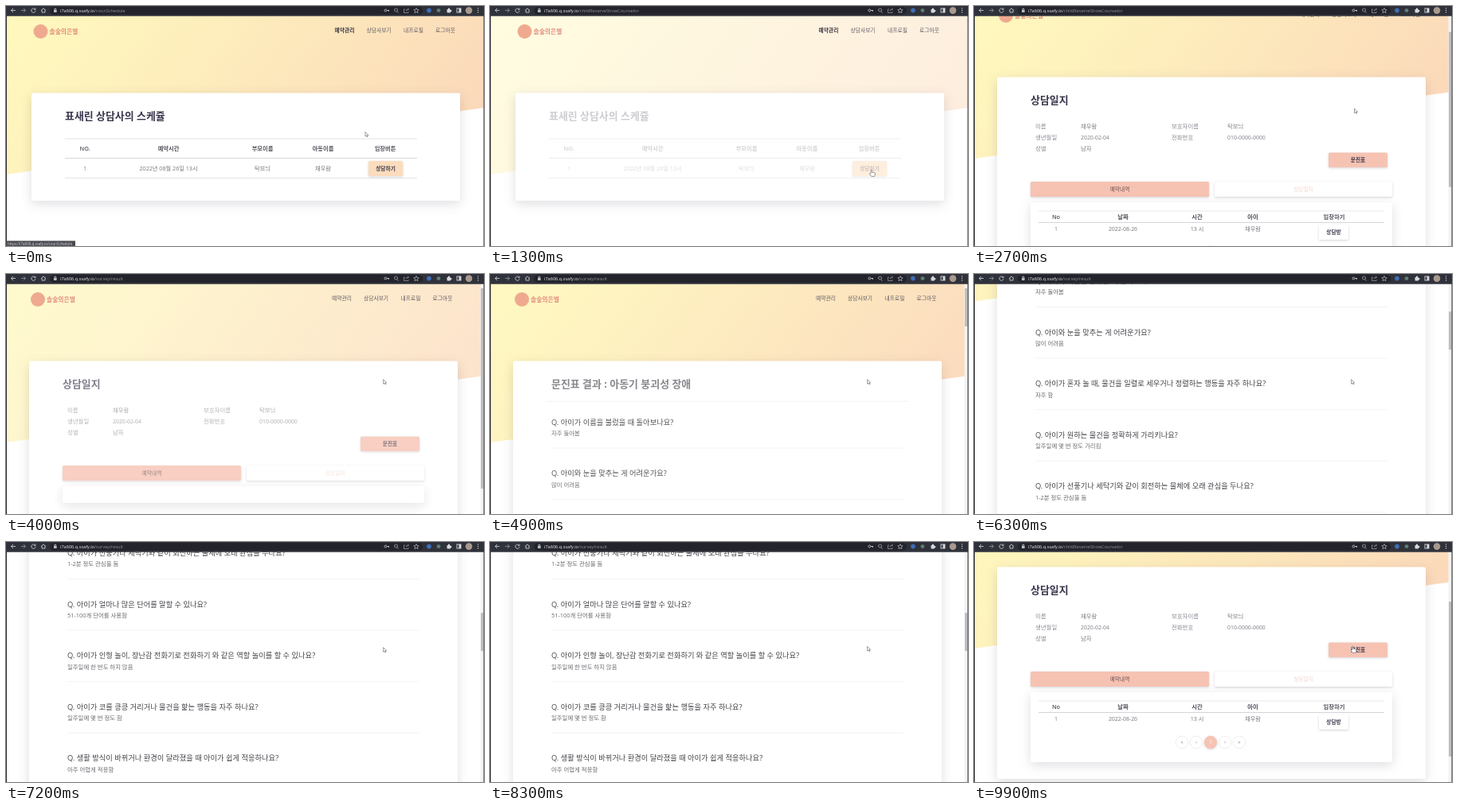
Write an HTML page that moves like this. It is 600x302 px and loops after 10000 ms.

```html
<!DOCTYPE html>
<html lang="ko">
<head>
<meta charset="utf-8">
<title>상담 예약</title>
<style>
html, body { margin: 0; width: 100%; height: 100%; overflow: hidden; background: #fff; }
svg { display: block; width: 600px; height: 302px; }
text { font-family: "Open Sans", "Noto Sans CJK KR", "Noto Sans CJK", sans-serif; white-space: pre; }
.card { fill: #fff; filter: drop-shadow(0 4px 7px rgba(40, 40, 60, .15)); }
.lift { filter: drop-shadow(0 1.2px 1.6px rgba(40, 40, 60, .2)); }
.page, .page text { opacity: var(--fade); }
</style>
</head>
<body>
<svg id="stage" viewBox="0 0 600 302" xmlns="http://www.w3.org/2000/svg"></svg>
<script>
const LOOP = 10000;
const INK = '#38364c', GREY = '#77767e', PINK = '#f6c3b3', PEACH = '#fbdcbc';
const HOST = 'i7a606.q.ssafy.io';
const PARENT = '탁보늬', CHILD = '채우람', COUNSELOR = '표새린';

// --- drawing helpers ---
const text = (x, y, str, size, fill = INK, weight = 400, anchor = 'start') =>
  `<text x="${x}" y="${y + size * 0.36}" font-size="${size}" fill="${fill}" font-weight="${weight}" text-anchor="${anchor}">${str}</text>`;
const mid = (x, y, str, size, fill, weight) => text(x, y, str, size, fill, weight, 'middle');
const box = (x, y, w, h, fill, extra = '') =>
  `<rect x="${x}" y="${y}" width="${w}" height="${h}" fill="${fill}" ${extra}/>`;
const rule = (x1, x2, y, color, w = 0.8) =>
  `<path d="M${x1} ${y}H${x2}" stroke="${color}" stroke-width="${w}"/>`;
const button = (x, y, w, h, fill, label, color = INK, weight = 700) =>
  box(x, y, w, h, fill, 'rx="1.5" class="lift"') + mid(x + w / 2, y + h / 2 - 0.3, label, 6.7, color, weight);
const row = (xs, y, cells, size, fill, weight) =>
  cells.map((c, i) => mid(xs[i], y, c, /^[\d-]+$/.test(c) ? 6.95 : size, fill, weight)).join('');

// --- pages ---
function planPage() {
  const xs = [99, 204, 322, 398, 476];
  return text(74, 138, `${COUNSELOR} 상담사의 스케쥴`, 12.95, INK, 700)
    + rule(74, 516, 167, '#dcdce0') + rule(74, 516, 191.5, '#cfcfd5') + rule(74, 516, 216.5, '#dfdfe3')
    + row(xs, 179.5, ['NO.', '예약시간', '부모이름', '아동이름', '입장버튼'], 7.25, '#56545f', 600)
    + row(xs, 204, ['1', '2022년 08월 26일 13시', PARENT, CHILD], 7.2, GREY)
    + button(455, 195, 43, 19, PEACH, '상담하기');
}

function logPage() {
  const xs = [103, 187, 280, 350, 452];
  const info = [
    ['이름', CHILD, '보호자이름', PARENT],
    ['생년월일', '2020-02-04', '전화번호', '010-0000-0000'],
    ['성별', '남자']
  ].map((cells, r) => cells.map((c, i) =>
    text([77, 134, 248, 318][i], 171.5 + r * 13.8, c, /^\d/.test(c) ? 6.9 : 7.4, i % 2 ? '#7d7b84' : '#8b8993')).join('')).join('');
  const pager = ['«', '‹', '1', '›', '»'].map((c, i) => {
    const x = 261 + i * 18, on = c === '1';
    return `<circle cx="${x}" cy="330" r="7.8" fill="${on ? PINK : '#fff'}" stroke="${on ? PINK : '#e6e6ea'}" stroke-width=".7" ${on ? 'class="lift"' : ''}/>`
      + mid(x, 330, c, 6.8, on ? '#fff' : '#9a9aa4');
  }).join('');
  return text(71, 138, '상담일지', 12.95, INK, 700) + info
    + button(445, 204.5, 74, 18.5, PINK, '문진표')
    + button(71, 241, 224, 19, PINK, '예약내역', '#6b4f50', 500)
    + button(302, 241, 223, 19, '#fff', '상담일지', '#f2d3c8', 500)
    + '<rect id="panel" class="card" x="71" y="267" width="454" height="88" rx="2"/>'
    + '<g id="rows">'
    + rule(81, 515, 278, '#e4e4e8') + rule(81, 515, 292.5, '#c9c9d0')
    + row(xs, 285, ['No', '날짜', '시간', '아이', '입장하기'], 7.3, '#504e5a', 600)
    + row(xs, 300.7, ['1', '2022-08-26', '13 시', CHILD], 7.2, GREY)
    + button(433, 295, 37, 19, '#fff', '상담방') + pager + '</g>';
}

function quizPage() {
  const items = [
    ['아이가 이름을 불렀을 때 돌아보나요?', '자주 돌아봄'],
    ['아이와 눈을 맞추는 게 어려운가요?', '많이 어려움'],
    ['아이가 혼자 놀 때, 물건을 일렬로 세우거나 정렬하는 행동을 자주 하나요?', '자주 함'],
    ['아이가 원하는 물건을 정확하게 가리키나요?', '일주일에 몇 번 정도 가리킴'],
    ['아이가 선풍기나 세탁기와 같이 회전하는 물체에 오래 관심을 두나요?', '1-2분 정도 관심을 둠'],
    ['아이가 얼마나 많은 단어를 말할 수 있나요?', '51-100개 단어를 사용함'],
    ['아이가 인형 놀이, 장난감 전화기로 전화하기 와 같은 역할 놀이를 할 수 있나요?', '일주일에 한 번도 하지 않음'],
    ['아이가 코를 킁킁 거리거나 물건을 핥는 행동을 자주 하나요?', '일주일에 몇 번 정도 함'],
    ['생활 방식이 바뀌거나 환경이 달라졌을 때 아이가 쉽게 적응하나요?', '아주 어렵게 적응함']
  ];
  return text(77, 138.4, '문진표 결과 : 아동기 붕괴성 장애', 12.95, '#7c7c82', 700)
    + rule(71, 525, 160.3, '#eeeeef')
    + items.map(([q, a], i) => {
      const y = 186.3 + i * 64.6;
      return text(77, y, 'Q. ' + q, 9.27, '#434349', 500) + text(77, y + 14, a, 7.4, '#68686e')
        + rule(77, 519, y + 32.8, '#f0f0f1');
    }).join('');
}

const navItems = [['예약관리', 409], ['상담사보기', 449], ['내프로필', 495.5], ['로그아웃', 535.5]];
const header = '<circle cx="40" cy="32" r="9" fill="#efa98f"/>'
  + text(51, 32, '솔숲의은별', 7.8, '#e28d7e', 700)
  + navItems.map(([s, x], i) => `<g id="nav${i}" fill="#5f5a64" font-weight="500">${text(x, 31, s, 6.75, 'inherit', 'inherit')}</g>`).join('');

function browserBar() {
  const line = (d, c = '#c8cad0') => `<path d="${d}" fill="none" stroke="${c}" stroke-width=".9"/>`;
  return box(0, 0, 600, 12.7, '#30323b') + box(55, 1, 468, 9.8, '#23242b', 'rx="4.9"')
    + line('M12 5.5H6.5M9 3L6.5 5.5L9 8')
    + line('M19 5.5H24.5M22 3L24.5 5.5L22 8', '#8c8e96')
    + line('M36.6 4.2A2.6 2.6 0 1 0 37 6.2M37 2.8V4.6H35.2')
    + line('M44 5.6L47 3L50 5.6M45 5V8H49V5')
    + box(60, 5, 3.6, 3, '#b9bbc2') + line('M60.8 5V4A1 1 0 0 1 62.8 4V5')
    + `<text x="68" y="7.8" font-size="5.6" fill="#eceef2">${HOST}<tspan id="path" fill="#8f929b"></tspan></text>`
    + line('M478 5.5H481M480.3 5.5V7M476.4 4A1.5 1.5 0 1 0 476.5 4')
    + line('M491 7L492.6 8.6M489.5 3A2 2 0 1 0 489.6 3', '#a4a6ad')
    + line('M501 4H499.5V8.5H505V7M502 6.5Q502 4 505.5 4M504 2.5L505.5 4L504 5.5', '#85878f')
    + line('M515 2.6L516 4.7L518.2 4.9L516.5 6.4L517 8.6L515 7.4L513 8.6L513.5 6.4L511.8 4.9L514 4.7Z', '#a4a6ad')
    + '<circle cx="531" cy="5.6" r="2.8" fill="#3f6fb8"/><circle cx="543" cy="5.6" r="2.4" fill="#5f7f74"/>'
    + box(553.5, 4, 4.6, 4.6, '#d5d7dc', 'rx=".8"') + '<circle cx="556" cy="3.6" r="1.1" fill="#d5d7dc"/><circle cx="558.4" cy="6.2" r="1.1" fill="#d5d7dc"/>'
    + box(566, 3, 5, 5, 'none', 'stroke="#d5d7dc" stroke-width=".9"') + box(568.5, 3, 2.5, 5, '#d5d7dc')
    + '<circle cx="581" cy="5.6" r="4.3" fill="#a89a8e"/>'
    + [3, 5.5, 8].map(y => `<circle cx="592.5" cy="${y}" r=".7" fill="#c8cad0"/>`).join('');
}

const stage = document.getElementById('stage');
stage.innerHTML = `
<defs><linearGradient id="sun" gradientUnits="userSpaceOnUse" x1="75" y1="-80" x2="525" y2="250">
  <stop offset="0" stop-color="#fff8bd"/><stop offset=".25" stop-color="#fef2bd"/><stop offset="1" stop-color="#fbd8ba"/>
</linearGradient></defs>
${box(0, 0, 600, 302, '#fff')}
<g id="doc">
  <path id="sky" d="M0 0H600V128L0 212Z" fill="url(#sun)"/>
  <g id="head">${header}</g>
  <rect id="sheet" class="card" y="109.6" width="538" rx="2"/>
  <g id="plan" class="page">${planPage()}</g>
  <g id="log" class="page">${logPage()}</g>
  <g id="quiz" class="page">${quizPage()}</g>
</g>
<g id="scroll">${box(595.5, 12, 4.5, 290, '#f3f3f3')}<rect id="thumb" x="596" width="3.5" fill="#bfbfc1"/></g>
${box(0, 12, 1, 290, '#26272c')}${box(599.3, 12, 0.7, 290, '#55565c')}
${browserBar()}
<g id="status">${box(0, 295.5, 87, 6.5, '#4a4b50')}${text(2, 298.9, `https://${HOST}/counSchedule`, 4.5, '#d6d6da')}</g>
<g id="cursor" stroke="#4a4a50" stroke-width=".55" stroke-linejoin="round" fill="#fff">
  <path id="arrow" d="M0 0V5.6L1.4 4.5L2.3 6.3L3.2 5.9L2.4 4.2H4Z"/>
  <path id="hand" d="M0 .6Q.7 -.4 1.4 .6V3.2L5 4Q5.6 4.3 5.4 5.2L4.8 8.4H.8L-1.6 5.4Q-1.4 4.2 0 5Z"/>
</g>`;
const $ = id => document.getElementById(id);
const set = (id, attrs) => { for (const k in attrs) $(id).setAttribute(k, attrs[k]); };
const show = (id, on) => set(id, { display: on ? 'inline' : 'none' });

// --- timeline ---
const visits = ['plan', 'log', 'quiz', 'log'];
const paths = { plan: '/counSchedule', log: '/childReserveShowCounselor', quiz: '/survey/result' };
const sheets = { plan: 135.4, log: 266.4, quiz: 1640 };
const bars = { plan: [0, 0], log: [0.73, 195], quiz: [0.165, 48] };
// each change of page: leave, swap, settled
const swaps = [[1000, 1400, 1900], [3800, 4350, 4950], [8500, 8900, 9300]];
const part = (t, a, b) => Math.min(1, Math.max(0, (t - a) / (b - a)));
const mix = (a, b, p) => a + (b - a) * p;
const smooth = p => p * p * (3 - 2 * p);

function scrollAt(t) {
  if (t < swaps[1][0]) return 78 * part(t, 2490, 3310);
  if (t < swaps[2][0]) return 431 * (1 - Math.pow(1 - part(t, 6100, 7150), 2.5));
  return 78 * part(t, 9000, 9500);
}

function cursorAt(t) {
  if (t < 2300) {
    const p = smooth(part(t, 50, 800));
    return [mix(451, 478, p), mix(158.5, 206, p), p > 0.85];
  }
  if (t < swaps[1][0]) {
    const p = smooth(part(t, 2750, 3300));
    return [mix(477.5, 474.5, p), mix(129, 131, p), t > 3200];
  }
  if (t < 9450) return [473.7, t < 8300 ? 132.7 : 131.4, false];
  return [474.5, 131, true];
}

function draw(t) {
  const page = visits[swaps.filter(s => t >= s[1]).length];
  const place = visits[swaps.filter(s => t >= s[0]).length];
  const alpha = swaps.reduce((a, [out, swap, end]) =>
    t < out ? a : a * (t < swap ? 1 - part(t, out, swap) : part(t, swap, end)), 1);
  const y = scrollAt(t), plan = page === 'plan';

  set('doc', { transform: `translate(0 ${-y})` });
  set('sky', { opacity: 0.3 + 0.7 * alpha });
  set('head', { transform: `translate(${plan ? 3.5 : 0} 0)` });
  set('nav0', { 'font-weight': plan ? 700 : 500, fill: plan ? '#3f3a46' : '#5f5a64' });
  set('sheet', { x: plan ? 32 : 29, height: sheets[page] });
  for (const id in paths) show(id, id === page);
  // text lies inside a fading page, so it fades twice as fast as the shapes
  stage.style.setProperty('--fade', Math.sqrt(alpha));
  const emptied = page === 'log' && place === 'quiz';
  show('rows', !emptied);
  set('panel', { height: emptied ? 21 : 88 });

  const [ratio, len] = bars[page];
  show('scroll', !plan);
  set('thumb', { y: 18 + ratio * y, height: emptied ? 252 : len });
  $('path').textContent = paths[place];
  show('status', t < 300);

  const [cx, cy, hand] = cursorAt(t);
  set('cursor', { transform: `translate(${cx} ${cy})` });
  show('arrow', !hand);
  show('hand', hand);
}

const start = performance.now();
function tick() {
  draw((performance.now() - start) % LOOP);
  requestAnimationFrame(tick);
}
tick();
</script>
</body>
</html>
```
